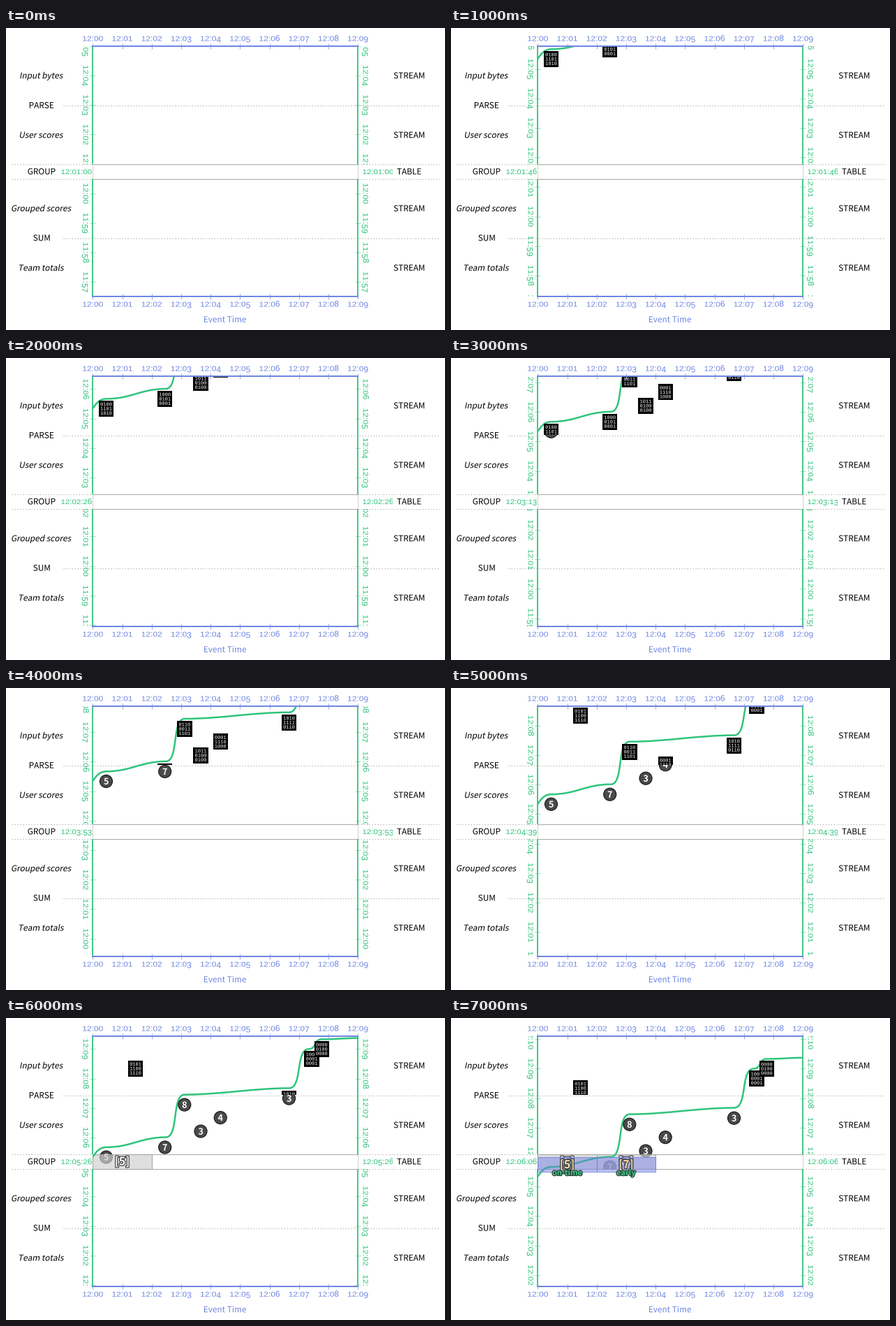
Write a matplotlib script that moves like this. It is 629 px wide and 432 px high and loops after 8 s.

```python
import math

import matplotlib.pyplot as plt
from matplotlib.animation import FuncAnimation
from matplotlib.patches import Circle, PathPatch, Rectangle
from matplotlib.path import Path
from matplotlib.textpath import TextPath
from matplotlib.transforms import Affine2D, Bbox

W, H = 629, 432
PX = 0.72                       # one pixel in points at 100 dpi
LEFT, RIGHT, TOP, BOTTOM = 124.3, 504.3, 26, 384
PARSE, BAND_TOP, BAND_END = 110, 194.6, 216
MINUTE = 42.2                   # pixels per minute on both axes
BLUE, GREEN = "#7087e2", "#2fc47c"
SANS = "Noto Sans CJK JP"

# event x, processing minute, digit, binary lines
EVENTS = [
    (143.5, 5.336, "5", "0100 1101 1010"),
    (227.7, 5.668, "7", "1000 0101 0001"),
    (279, 6.212, "3", "1011 0100 0100"),
    (307.2, 6.673, "4", "0001 1110 1000"),
    (255.8, 7.111, "8", "0110 0011 1101"),
    (405.5, 7.325, "3", "1010 1111 0110"),
    (185.5, 8.338, "9", "0101 1100 1110"),
    (438, 8.667, "8", "1001 0001 0001"),
    (452.3, 8.997, "1", "0000 0100 0000"),
]
# watermark knots: x, minute, handle length towards the next knot
KNOTS = [(105, 5.02, .5), (143.5, 5.67, .42), (229, 6.01, .7),
         (256, 7.455, .35), (405.5, 7.672, .7), (434, 9.0, .6),
         (452, 9.33, .4), (504.5, 9.37, 0)]
# window start, first arrival, sum, pane timing
WINDOWS = [(0, 5.336, "[5]", "on-time"), (2, 5.668, "[7]", "early")]
FIRE = 6.0

fig = plt.figure(figsize=(W / 100, H / 100), dpi=100, facecolor="white")
ax = fig.add_axes([0, 0, 1, 1])
ax.set_xlim(0, W)
ax.set_ylim(H, 0)
ax.axis("off")
live = []


def box(x0, y0, x1, y1):
    return Bbox([[x0, H - y1], [x1, H - y0]])


STAGE = box(0, 0, W, H)
PLOT = box(LEFT, TOP - 1, RIGHT, BOTTOM)
BYTES = box(LEFT, TOP - 1, RIGHT, PARSE)
SCORES = box(LEFT, PARSE, RIGHT, BAND_TOP)
BAND = box(LEFT, BAND_TOP, RIGHT, BAND_END)
SCALE_PARTS = [box(0, TOP, W, BAND_TOP), box(0, BAND_END, W, BOTTOM)]


def add(patch, z, clip=STAGE):
    ax.add_patch(patch)
    patch.set_zorder(z)
    patch.set_clip_path(None)
    patch.set_clip_box(clip)
    live.append(patch)


def line(x0, y0, x1, y1, color, width, z=2, clip=STAGE, dash="-"):
    patch = PathPatch(Path([(x0, y0), (x1, y1)]), fill=False, ec=color,
                      lw=width * PX, ls=dash, capstyle="butt")
    add(patch, z, clip)


def ink(path, color, z, clip=STAGE, outline=None, width=2.4):
    if outline:
        add(PathPatch(path, fc=outline, ec=outline, lw=width * PX,
                      joinstyle="round"), z, clip)
    add(PathPatch(path, fc=color, lw=0), z + .01, clip)


def words(x, y, s, size, color="black", slant=0, weight="normal", middle=False,
          z=4, clip=STAGE, outline=None):
    """Text centred on x, with its baseline (or middle) at y."""
    path = TextPath((0, 0), s, size=size, prop=dict(family=SANS, weight=weight))
    path = path.transformed(Affine2D().skew_deg(slant, 0).scale(1, -1))
    b = path.get_extents()
    dy = y - (b.y0 + b.y1) / 2 if middle else y
    path = path.transformed(Affine2D().translate(x - (b.x0 + b.x1) / 2, dy))
    ink(path, color, z, clip, outline)


def figures(s, size):
    """Old-style figures: low 0-2, hanging 3, 4, 5, 7 and 9."""
    parts, x = [], 0
    for c in s:
        glyph = TextPath((0, 0), c, size=size,
                         prop=dict(family="Liberation Sans"))
        tall = .84 if c in "012" else 1
        drop = -.16 * size if c in "34579" else 0
        parts.append(glyph.transformed(
            Affine2D().scale(1, tall).translate(x, drop)))
        x += size * (.278 if c == ":" else .556)
    return Path.make_compound_path(*parts), x


def stamp(s, x, y, size, color, turn=0, centred=True, clip=STAGE):
    path, width = figures(s, size)
    place = Affine2D().translate(-width / 2 if centred else 0, 0)
    place = place.scale(1, -1).rotate_deg(turn).translate(x, y)
    ink(path.transformed(place), color, 4, clip)


def clock(minutes):
    total = int(minutes)
    return f"{11 + total // 60}:{total % 60:02d}"


def draw_stage():
    for k in range(10):
        x = LEFT + MINUTE * k
        for y, base in ((TOP, 18.6), (BOTTOM, 398.6)):
            line(x, y - 4, x, y + 4, "#9aa9e8", 1, 5)
            stamp(f"12:{k:02d}", x, base, 12, BLUE)
    for y in (TOP, BOTTOM):
        line(LEFT - 1, y, RIGHT + 1, y, BLUE, 2, 6)
    for x in (LEFT, RIGHT):
        line(x, TOP, x, BAND_TOP, GREEN, 1.8, 5)
        line(x, BAND_END, x, BOTTOM, GREEN, 1.8, 5)
        line(x, BAND_TOP, x, BAND_END, "#d0d0d0", 1, 1)
    dots = (0, (1.5, 2.5))
    for y, x0 in ((110.5, 82), (300.5, 82), (194.5, 8), (215.5, 8)):
        line(x0, y, 621, y, "#b4b4b4", 1, 1, dash=dots)
    for y in (194.5, 215.5):
        line(LEFT, y, RIGHT, y, "#a8a8a8", 1, 1)
    rows = [(68, "Input bytes"), (153, "User scores"),
            (258, "Grouped scores"), (343, "Team totals")]
    for y, name in rows:
        words(51, y + 4.2, name, 11.8, slant=11)
        words(577.5, y + 4.2, "STREAM", 11.8)
    for y, name in ((110.5, "PARSE"), (205.2, "GROUP"), (300.2, "SUM")):
        words(51, y + 4.2, name, 11.8)
    words(577.5, 209.4, "TABLE", 11.8)
    words(314, 421, "Event Time", 11.8, BLUE)


def draw_scale(now, height):
    seconds = int(now * 60)
    label = f"12:{seconds // 60:02d}:{seconds % 60:02d}"
    stamp(label, 78.5, 209, 11.5, GREEN, centred=False, clip=box(0, 0, 124, H))
    stamp(label, 510.5, 209, 11.5, GREEN, centred=False,
          clip=box(0, 0, 554, H))
    for m in range(math.floor(now) - 6, math.floor(now) + 6):
        y = height(m)
        for clip in SCALE_PARTS:
            for axis, base in ((LEFT, 110.7), (RIGHT, 511.7)):
                stamp(clock(60 + m), base, y, 12, GREEN, turn=90, clip=clip)
                line(axis - 4, y, axis + 4, y, "#a0e2c4", 1, 4, clip)


def draw_watermark(height):
    points, codes = [(KNOTS[0][0], height(KNOTS[0][1]))], [Path.MOVETO]
    for (x0, t0, k), (x1, t1, _) in zip(KNOTS, KNOTS[1:]):
        reach = k * (x1 - x0)
        points += [(x0 + reach, height(t0)), (x1 - reach, height(t1)),
                   (x1, height(t1))]
        codes += [Path.CURVE4] * 3
    add(PathPatch(Path(points, codes), fill=False, ec=GREEN, lw=2.5 * PX),
        2.5, PLOT)


def draw_bytes(x, y, bits, z):
    add(Rectangle((x - 10.7, y - 11.5), 21.4, 23, fc="black", lw=0), z, BYTES)
    for k, row in enumerate(bits.split()):
        path = TextPath((0, 0), row, size=7,
                        prop=dict(family="Liberation Mono"))
        place = Affine2D().scale(1, -1).translate(x - 8.4, y + 6.3 * k - 4.1)
        ink(path.transformed(place), "white", z + .02, BYTES)


def draw_score(x, y, digit, z):
    looks = [(SCORES, "#4a4a4a", "#1c1c1c", "white"),
             (BAND, "#a6a6a6", "#969696", "#dedede")]
    for clip, fill, edge, text in looks:
        add(Circle((x, y), 9, fc=fill, ec=edge, lw=1.2 * PX), z, clip)
        words(x, y, digit, 12.5, text, weight="bold", middle=True,
              z=z + .02, clip=clip)


def draw_windows(now):
    for start, arrival, total, timing in WINDOWS:
        if now < arrival:
            continue
        x, width = LEFT + MINUTE * start, 2 * MINUTE
        mid = x + width / 2
        add(Rectangle((x, BAND_TOP), width, BAND_END - BAND_TOP,
                      fc="#dfdfdf", ec="#a0a0a0", lw=PX), 2)
        words(mid, 205.5, total, 16, "white", weight="bold", middle=True,
              z=3.6, outline="#3c3c3c")
        if now < FIRE:
            continue
        shift = MINUTE * (now - FIRE)
        add(Rectangle((x, BAND_TOP + shift), width, BAND_END - BAND_TOP,
                      fc=(.42, .47, .9, .45), ec=(.45, .5, .85, .8), lw=PX),
            3.8)
        words(mid, 205.5 + shift, total, 16, "#f3dfa6", weight="bold",
              middle=True, z=4, outline="#3c3c3c")
        words(mid, 220.5 + shift, timing, 11, "#3fd08a", weight="bold",
              z=4.1, outline="#2c3c34")


def update(i):
    while live:
        live.pop().remove()
    # the clock advances in whole ticks of 6.66 s
    now = 1 + math.floor(46 / 7 * i + .6) * 6.66 / 60

    def height(minute):
        return BAND_TOP - MINUTE * (minute - now)

    draw_stage()
    draw_scale(now, height)
    draw_watermark(height)
    draw_windows(now)
    for k, (x, t, digit, bits) in enumerate(EVENTS):
        y, z = height(t), 3 + .05 * k
        if y > BAND_END + 12 or y < TOP - 14:
            continue
        if y < PARSE + 12:
            draw_bytes(x, y, bits, z)
        if y > PARSE - 10:
            draw_score(x, y, digit, z)
    return live


anim = FuncAnimation(fig, update, frames=8, interval=1000, repeat=True,
                     repeat_delay=0, init_func=lambda: live)
plt.show()
```
